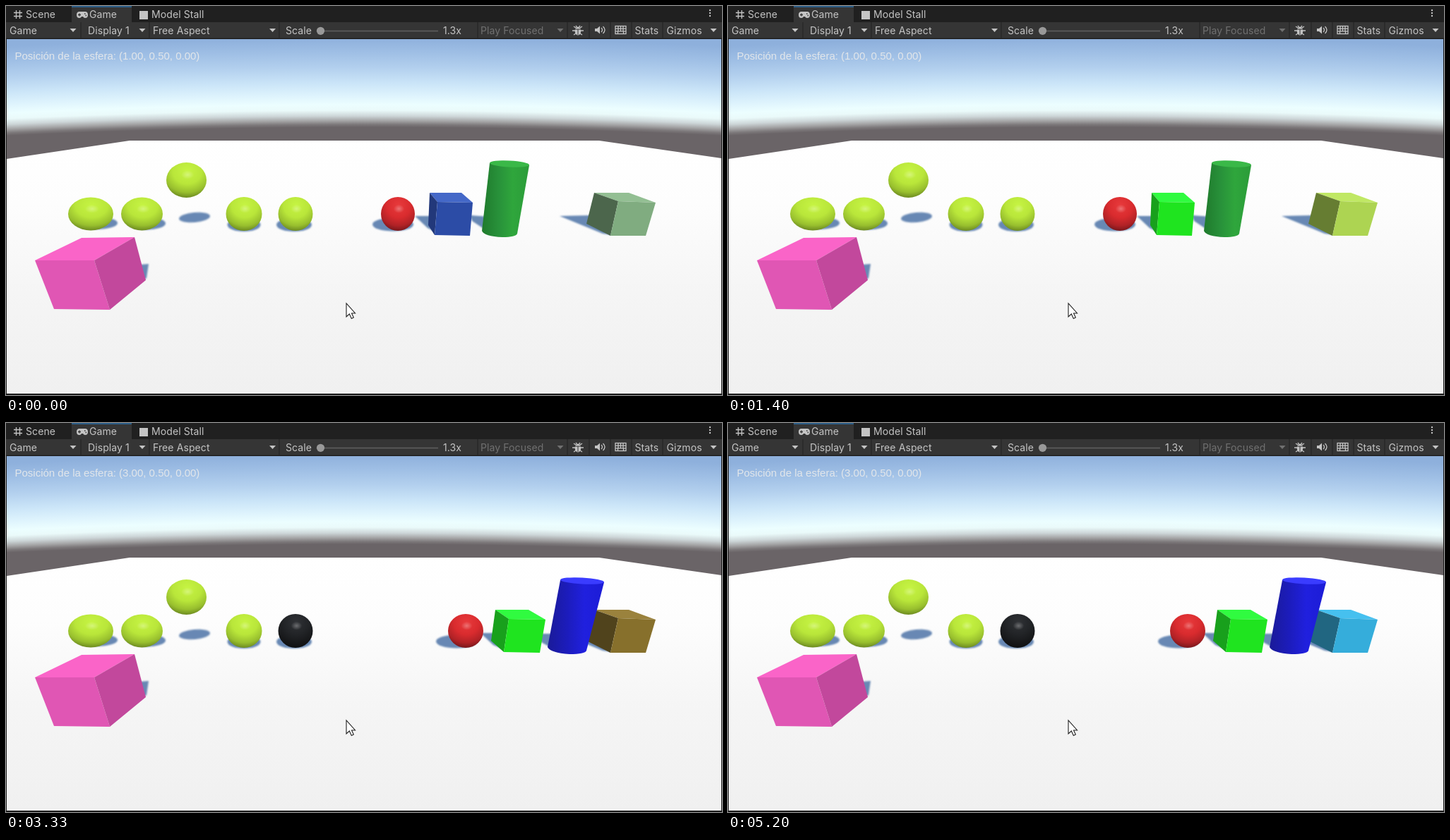
Write an HTML page that moves like this. It is 1014x552 px and loops after 5.27 s.

```html
<!DOCTYPE html>
<html lang="es">
<head>
<meta charset="utf-8">
<style>
  html, body { margin: 0; width: 100%; height: 100%; overflow: hidden; background: #1d1d1d; }
  svg { display: block; width: 1014px; height: 552px; }
  .ui { font: 14px Inter, sans-serif; fill: #c4c4c4; letter-spacing: .1px; }
  .label { font: 15px "Liberation Sans", Arial, sans-serif; fill: #e2e6ea; }
</style>
</head>
<body>
<svg id="stage" viewBox="0 0 1014 552"></svg>
<script>
const LOOP = 5270;
const stage = document.getElementById('stage');

const rect = (x, y, w, h, fill, more = '') =>
  `<rect x="${x}" y="${y}" width="${w}" height="${h}" fill="${fill}" ${more}/>`;
const poly = (points, fill, more = '') => `<polygon points="${points}" fill="${fill}" ${more}/>`;
const oval = (x, y, rx, ry, fill, more = '') =>
  `<ellipse cx="${x}" cy="${y}" rx="${rx}" ry="${ry}" fill="${fill}" ${more}/>`;
const text = (x, y, s, more = '') => `<text x="${x}" y="${y}" ${more}>${s}</text>`;
const stops = list => list.map(([o, c]) => `<stop offset="${o}" stop-color="${c}"/>`).join('');
const linear = (id, list, dir) => `<linearGradient id="${id}" ${dir}>${stops(list)}</linearGradient>`;
const ball = (id, colors) =>
  `<radialGradient id="${id}" cx=".52" cy=".25" r=".8">${stops(colors.map((c, i) => [[0, .45, .75, 1][i], c]))}</radialGradient>`;
const shadow = (x, y, rx, ry, more) => oval(x, y, rx, ry, '#6788b4', `filter="url(#soft)" ${more || ''}`);
const shade = points => poly(points, '#6788b4', 'filter="url(#soft)"');
const sphere = (x, y, rx, ry, fill, id = '') =>
  oval(x, y, rx, ry, fill, id && `id="${id}"`) +
  oval(x + rx * .06, y - ry * .3, rx * .32, ry * .25, 'url(#shine)');

// The horizon is a slightly bent arc, so the sky uses a very large circle.
const HORIZON = 10865, RADIUS = 10820;
const sky = [[172, '#6a6467'], [168, '#7d797b'], [163, '#a3a3a4'], [156, '#cdd6d8'], [148, '#eafafa'],
  [140, '#ecfeff'], [128, '#dff4fd'], [110, '#cbe5f8'], [88, '#b3d0ee'], [66, '#9fbfe5'], [45, '#8eb0dc']]
  .map(([y, c]) => [(HORIZON - y) / RADIUS, c]);

const defs = `<defs>
  <filter id="soft" x="-20%" y="-30%" width="140%" height="160%"><feGaussianBlur stdDeviation=".9"/></filter>
  <radialGradient id="sky" gradientUnits="userSpaceOnUse" cx="507" cy="${HORIZON}" r="${RADIUS}">${stops(sky)}</radialGradient>
  <radialGradient id="shine"><stop offset="0" stop-color="#fff" stop-opacity=".3"/><stop offset="1" stop-color="#fff" stop-opacity="0"/></radialGradient>
  ${linear('ground', [[0, '#fff'], [.25, '#fdfdfd'], [.6, '#f5f5f5'], [1, '#f0f0f0']], 'x2="0" y2="1"')}
  ${ball('lime', ['#c6f443', '#b9e63a', '#98bf2e', '#5f7a1c'])}
  ${ball('red', ['#e83a3c', '#d92b2e', '#b02226', '#681418'])}
  ${ball('black', ['#303236', '#222427', '#17181a', '#0c0d0e'])}
  ${linear('greenSide', [[0, '#1f7a2c'], [.35, '#28913a'], [.65, '#2fa63c'], [1, '#2b9c39']], '')}
  ${linear('blueSide', [[0, '#1a1a98'], [.35, '#1c1cbc'], [.65, '#2020de'], [1, '#1c1cd6']], '')}
</defs>`;

const arrow = (x, fill = '#c4c4c4') => poly(`${x - 4.5},32 ${x + 4.5},32 ${x},37`, fill);

const icons = `<g fill="none" stroke="#c4c4c4" stroke-width="1.3">
    <path d="M14.5 6V18M19.5 6V18M11 9.5H23M11 14.5H23"/>
    <path d="M804 29l3 2M816 29l-3 2M802 35h4M814 35h4M804 41l3-2M816 41l-3-2M807 28l1.5 2M813 28l-1.5 2"/>
    <path d="M843 31q3 3 0 6M845.500 29q5 5 0 10"/>
    <rect x="863" y="28.500" width="15" height="11"/>
    <path d="M863 32.200H878M863 35.800H878M867 28.500V36M870.500 28.500V36M874 28.500V36M866.500 36V39M874.500 36V39"/>
  </g>
  <path d="M104 8h8q4 0 4 4.500t-4 4.500q-2 0-3-2h-2q-1 2-3 2-4 0-4-4.500t4-4.500z" fill="#c4c4c4"/>
  <path d="M102 12.500h4M104 10.500v4M111 11h1.500M112.500 13.500h1.500" stroke="#353535" stroke-width="1.300"/>
  ${rect(189, 7, 12, 12, '#c4c4c4')}
  ${oval(810, 35.5, 4.3, 6, '#c4c4c4')}
  <path d="M806 33h8M810 33v8" stroke="#353535"/>
  ${poly('834,32 837,32 841,28.5 841,39.5 837,36 834,36', '#c4c4c4')}
  ${[6, 10, 14].map(y => oval(997, y, 1.2, 1.2, '#c4c4c4')).join('')}`;

const bar = rect(0, 0, 1014, 47, '#202020') + rect(93, 0, 85, 23, '#353535') + rect(93, 0, 85, 2, '#2c5d87') +
  rect(0, 23, 1014, 22.5, '#353535') +
  [106, 203, 387, 668, 795, 826, 856, 886, 930].map(x => rect(x - .5, 23, 1, 22.5, '#222')).join('') +
  `<g class="ui">${[[28, 17, 'Scene'], [118, 17, 'Game'], [206, 17, 'Model Stall'], [5, 40, 'Game'],
    [116, 40, 'Display 1'], [208, 40, 'Free Aspect'], [396, 40, 'Scale'], [619, 40, '1.3x'],
    [890.5, 40, 'Stats'], [935.5, 40, 'Gizmos']].map(a => text(...a)).join('')}
    ${text(672, 40, 'Play Focused', 'fill="#707070"')}</g>` +
  [95, 193, 377.5, 1002].map(x => arrow(x)).join('') + arrow(785, '#707070') +
  rect(445, 34.7, 167, 1.6, '#5e5e5e') + oval(445.5, 35.3, 5.6, 5.6, '#999') + icons;

const world = rect(1, 47, 1012, 503, 'url(#sky)') +
  poly('1,217 175,191 840,191 1013,216 1013,550 1,550', 'url(#ground)') +
  shadow(128, 308, 30, 9) + shadow(199, 308.5, 27, 9) +
  shadow(267, 300, 22, 7, 'transform="rotate(-5 267 300)"') +
  shadow(337, 310.5, 23.5, 9.5) + shadow(408, 310.5, 25, 9.5) +
  sphere(120, 295, 32, 23.5, 'url(#lime)') + sphere(192.5, 295, 29.5, 23.5, 'url(#lime)') +
  sphere(255.5, 247, 28.5, 25, 'url(#lime)') + sphere(337, 295, 25.5, 24, 'url(#lime)') +
  sphere(410, 295, 24.5, 24, 'url(#lime)', 'last') +
  shade('190,367 202,366 199,386 192,390') +
  poly('41,361 107,329 182,328 125,361', '#fa64c8') +
  poly('41,361 125,361 147,431 68,430', '#e056b4') +
  poly('125,361 182,328 198,389 147,431', '#c2489c') +
  shade('784,298 830,297 858,325 845,323') +
  poly('833,265 882,265 920,279 867,277', '', 'id="mixTop"') +
  poly('833,265 867,277 856,326 822,309', '', 'id="mixLeft"') +
  poly('867,277 920,279 906,326 856,326', '', 'id="mixFront"') +
  '<g id="trio"></g>' +
  `<text x="12.5" y="76" class="label">Posición de la esfera: (<tspan id="pos"></tspan>, 0.50, 0.00)</text>` +
  '<path d="M482 422V441L486.300 437 489.300 443.500 492.300 442 489.500 436H494.500Z" fill="#fff" stroke="#222" stroke-width="1.100"/>' +
  rect(0, 550, 1014, 2, '#1d1d1d') + rect(0, 45.5, 1014, 1.5, '#1d1d1d');

stage.innerHTML = defs + rect(0, 0, 1014, 552, '#1d1d1d') + world + bar;
const $ = id => document.getElementById(id);

const near = {
  redX: 555, redR: 24, redShade: 548,
  shades: ['579,298 602,298 607,320 597,315', '657,297 684,299 678,317 660,305'],
  top: '600,265 645,265 661,279 611,278', left: '600,265 611,278 607,325 598,311',
  front: '611,278 661,279 657,326 607,325',
  body: 'M685 223L674 319Q677 327 703 328 722 328 724 323L741 226Z', lid: [713, 224, 28]
};
const far = {
  redX: 651, redR: 25, redShade: 638,
  shades: ['672,298 695,298 704,321 690,315', '753,299 777,299 772,319 758,311'],
  top: '693,265 740,265 764,279 712,278', left: '693,265 712,278 705,325 687,309',
  front: '712,278 764,279 756,326 705,325',
  body: 'M785 223L767 318Q771 326 798 328 820 328 822 323L847 226Z', lid: [816, 224, 31]
};
const cubeBlue = ['#4468c8', '#22387a', '#2c4ca6'];
const cubeGreen = ['#30fb40', '#18a01c', '#1fe41f'];

function drawTrio(p, cube, side, lid) {
  return shadow(p.redShade, 310, 29, 9.5) + p.shades.map(shade).join('') +
    sphere(p.redX, 295, p.redR, 24, 'url(#red)') +
    poly(p.top, cube[0]) + poly(p.left, cube[1]) + poly(p.front, cube[2]) +
    `<path d="${p.body}" fill="url(#${side})"/>` +
    oval(p.lid[0], p.lid[1], p.lid[2], 4.6, lid, `transform="rotate(3 ${p.lid[0]} ${p.lid[1]})"`);
}

// One colour channel gets a new value at every step.
const firstMix = [128, 172, 128];
const mixSteps = [[0, 42], [1, 160], [2, 82], [0, 173], [1, 212], [1, 194], [1, 176], [0, 135], [2, 44],
  [1, 140], [1, 112], [0, 53], [1, 173], [2, 146], [2, 170], [2, 195], [2, 219]];
const rgb = (c, k, add) => `rgb(${c.map(v => Math.min(255, Math.round(v * k + add)))})`;

let shown = '';
function update(t) {
  const tick = Math.floor((t + 5) * 15 / 1000);
  const mix = firstMix.slice();
  mixSteps.slice(0, Math.floor((tick + 2) / 4.5)).forEach(([i, v]) => mix[i] = v);
  $('mixFront').setAttribute('fill', rgb(mix, 1, 0));
  $('mixLeft').setAttribute('fill', rgb(mix, .58, 2));
  $('mixTop').setAttribute('fill', rgb(mix, 1.02, 16));

  const green = tick >= 16, blue = tick >= 29, moved = tick >= 46;
  const state = [green, blue, moved].join();
  if (state === shown) return;
  shown = state;
  $('trio').innerHTML = drawTrio(moved ? far : near, green ? cubeGreen : cubeBlue,
    blue ? 'blueSide' : 'greenSide', blue ? '#3a3cff' : '#3ab848');
  $('last').setAttribute('fill', moved ? 'url(#black)' : 'url(#lime)');
  $('pos').textContent = moved ? '3.00' : '1.00';
}

const start = performance.now();
function frame() {
  update((performance.now() - start) % LOOP);
  requestAnimationFrame(frame);
}
frame();
</script>
</body>
</html>
```
